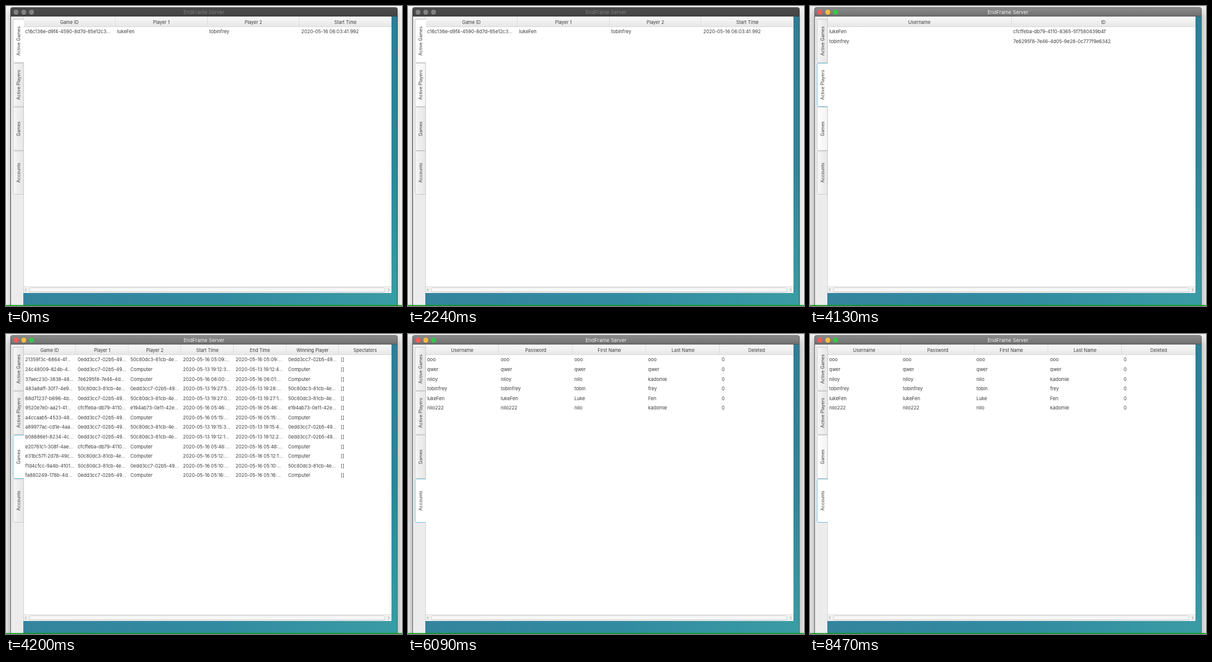
Write an HTML page with a canvas that moves like this. It is 640 by 485 pixels and loops after 8.61 s.

```html
<!DOCTYPE html>
<html lang="en">
<head>
<meta charset="utf-8">
<title>EndFrame Server</title>
<style>
  html, body { margin: 0; width: 100%; height: 100%; overflow: hidden; background: #fff; }
  canvas { display: block; width: 640px; height: 485px; }
</style>
</head>
<body>
<canvas id="stage" width="640" height="485"></canvas>
<script>
const ctx = document.getElementById('stage').getContext('2d');
const LOOP = 8610;
const FONT = 'Inter, "Open Sans", sans-serif';
const INK = '#3c3c3c';
const TABS = ['Active Games', 'Active Players', 'Games', 'Accounts'];

// [start time, tab index]; the window gains focus with the first click.
const FOCUS_AT = 2450;
const SELECTED = [[0, 0], [FOCUS_AT, 1], [4200, 2], [6090, 3]];
const HOVERED = [[0, -1], [1540, 1], [3570, 2], [5390, 3], [8190, 2]];

const TABLE = { x: 28, y: 17, w: 595, h: 447 };
const ROW_STEP = 15.58;

const ANN = '0edd3cc7-02b5-49...';
const BEA = '50c80dc3-81cb-4e...';
const CAL = 'cfcffeba-db79-4110...';
const DOT = 'e194ab73-0e11-42e...';
const EVE = '7e6295f8-7e46-4d...';
const BOT = 'Computer';
const game = (id, first, second, start, end, winner) =>
  [id + '...', first, second, `2020-05-${start}...`, `2020-05-${end}...`, winner, '[]'];
const account = (user, first, last) => [user, user, first, last, '0'];

const VIEWS = [
  {
    heads: ['Game ID', 'Player 1', 'Player 2', 'Start Time'],
    rows: [['c16c136e-d9f4-4590-8d7d-65e12c3...', 'lukeFen', 'tobinfrey', '2020-05-16 06:03:41.992']]
  },
  {
    heads: ['Username', 'ID'],
    rows: [
      ['lukeFen', 'cfcffeba-db79-4110-8365-5f7580439b4f'],
      ['tobinfrey', '7e6295f8-7e46-4d05-9e28-0c777f9e6342']
    ]
  },
  {
    heads: ['Game ID', 'Player 1', 'Player 2', 'Start Time', 'End Time', 'Winning Player', 'Spectators'],
    rows: [
      game('21359f3c-6864-4f', ANN, BEA, '16 05:09:', '16 05:09:', ANN),
      game('24c48009-824b-4', ANN, BOT, '13 19:12:3', '13 19:12:4', BOT),
      game('37aec230-3838-48', EVE, BOT, '16 06:00:', '16 06:01:', BOT),
      game('483a8aff-30f7-4e9', BEA, ANN, '13 19:27:5', '13 19:28:', BEA),
      game('68d71237-b696-4b', ANN, BEA, '13 19:27:0', '13 19:27:1', BEA),
      game('9520e7e0-aa21-41', CAL, DOT, '16 05:46:', '16 05:46:', DOT),
      game('a4ccaab5-4533-48', ANN, BOT, '16 05:15:', '16 05:15:', BOT),
      game('a89977ac-cd1e-4aa', ANN, BEA, '13 19:15:3', '13 19:15:4', ANN),
      game('b08686e1-8234-4c', ANN, BEA, '13 19:12:1', '13 19:12:2', ANN),
      game('e20761c1-308f-4ae', CAL, BOT, '16 05:48:', '16 05:48:', BOT),
      game('e31bc57f-2d78-49c', BEA, BOT, '16 05:12:', '16 05:12:1', BOT),
      game('f1d4cfcc-9a4b-4101', BEA, ANN, '16 05:10:', '16 05:10:', BEA),
      game('fa880249-176b-4d', ANN, BOT, '16 05:16:', '16 05:16:', BOT)
    ]
  },
  {
    heads: ['Username', 'Password', 'First Name', 'Last Name', 'Deleted'],
    rows: [
      account('ooo', 'ooo', 'ooo'),
      account('qwer', 'qwer', 'qwer'),
      account('niloy', 'nilo', 'kadomie'),
      account('tobinfrey', 'tobin', 'frey'),
      account('lukeFen', 'Luke', 'Fen'),
      account('nilo222', 'nilo', 'kadomie')
    ]
  }
];

const valueAt = (track, t) => track.filter(([start]) => start <= t).pop()[1];

function gradient(x0, y0, x1, y1, ...colors) {
  const g = ctx.createLinearGradient(x0, y0, x1, y1);
  colors.forEach((color, i) => g.addColorStop(i / (colors.length - 1), color));
  return g;
}

function rect(x, y, w, h, fill) {
  ctx.fillStyle = fill;
  ctx.fillRect(x, y, w, h);
}

function rounded(x, y, w, h, radius, fill, stroke) {
  ctx.beginPath();
  ctx.roundRect(x, y, w, h, radius);
  ctx.fillStyle = fill;
  ctx.fill();
  if (stroke) {
    ctx.strokeStyle = stroke;
    ctx.stroke();
  }
}

function text(str, x, y, size, color, align = 'left') {
  ctx.font = `${size}px ${FONT}`;
  ctx.textAlign = align;
  ctx.fillStyle = color;
  ctx.fillText(str, x, y);
}

function drawWindow(active) {
  rect(0, 0, 640, 485, '#f6f6f6');
  ctx.save();
  ctx.shadowColor = active ? 'rgba(0,0,0,.4)' : 'rgba(0,0,0,.25)';
  ctx.shadowBlur = active ? 15 : 10;
  ctx.shadowOffsetY = 5;
  rounded(7, 2, 626, 500, 4, active ? '#666' : '#484848');
  ctx.restore();

  const bar = active ? ['#8b8b8b', '#6d6d6d'] : ['#4c4c4c', '#434343'];
  rounded(8, 3, 624, 14, [3, 3, 0, 0], gradient(0, 3, 0, 17, ...bar));
  rect(8, 16, 624, 1, active ? '#585858' : '#3a3a3a');
  const lights = active ? ['#fc5b57', '#fdbc40', '#34c84a'] : ['#828282', '#828282', '#828282'];
  lights.forEach((color, i) => {
    ctx.beginPath();
    ctx.arc(16.2 + i * 12.5, 10, 3.9, 0, Math.PI * 2);
    ctx.fillStyle = color;
    ctx.fill();
  });
  text('EndFrame Server', 320, 13, 8.1, active ? '#f2f2f2' : '#7d7d7d', 'center');

  rect(8, 17, 20, 467, '#ececec');
  rect(28, 464, 604, 20, gradient(28, 0, 632, 0, '#34849d', '#318aa0', '#3a9ca5'));
  rect(623, 17, 9, 467, gradient(0, 17, 0, 484, '#2d7e97', '#2f8499', '#3a9ca5'));
}

function drawTab(i, selected, hovered, active) {
  const y = 22 + i * 71;
  const focused = selected && active;
  const fill = selected ? '#fff'
    : hovered ? gradient(12, 0, 28, 0, '#fff', '#f2f2f2')
    : gradient(12, 0, 28, 0, '#f5f5f5', '#e6e6e6');
  rounded(11.5, y - .5, 17, 70, [2, 0, 0, 2], fill, focused ? '#7cc2da' : '#cccccc');
  if (selected) rect(28, y, 1, 69, '#fff');
  ctx.save();
  ctx.translate(23, y + 34.5);
  ctx.rotate(-Math.PI / 2);
  text(TABS[i], 0, 0, 7.25, INK, 'center');
  ctx.restore();
}

function chevron(x, direction) {
  ctx.beginPath();
  ctx.moveTo(x - direction, 456.5);
  ctx.lineTo(x + direction, 459);
  ctx.lineTo(x - direction, 461.5);
  ctx.strokeStyle = '#a4a4a4';
  ctx.stroke();
}

function drawTable({ heads, rows }) {
  const { x, y, w, h } = TABLE;
  const columnWidth = w / heads.length;
  rect(x, y, w, h, '#fff');
  rect(x, y, w, 17, gradient(0, y, 0, y + 17, '#f9f9f9', '#e6e6e6'));
  rect(x, y + 16, w, 1, '#dadada');
  heads.forEach((head, i) => {
    const left = x + i * columnWidth;
    if (i) rect(Math.round(left) - 1, y, 1, 17, '#dedede');
    text(head, left + columnWidth / 2, 28.5, 7.4, INK, 'center');
  });
  rows.forEach((row, r) => row.forEach((cell, c) =>
    text(cell, x + 3 + c * columnWidth, 44.4 + r * ROW_STEP, 7.65, INK)));

  rect(x, 454, w, 10, '#f1f1f1');
  rect(x, 453, w, 1, '#e2e2e2');
  rounded(37.5, 455.5, 575, 7, 3, gradient(0, 455, 0, 463, '#fff', '#eee'), '#cecece');
  chevron(32, -1);
  chevron(618.5, 1);
  rect(x, y, 1, h, '#d6d6d6');
}

function draw(now) {
  const t = now % LOOP;
  const active = t >= FOCUS_AT;
  const selected = valueAt(SELECTED, t);
  const hovered = valueAt(HOVERED, t);
  ctx.lineWidth = 1;
  drawWindow(active);
  drawTable(VIEWS[selected]);
  TABS.forEach((_, i) => drawTab(i, i === selected, i === hovered, active));
  rect(0, 483.5, 640, 1.5, '#0a9a14');
  requestAnimationFrame(draw);
}
requestAnimationFrame(draw);
</script>
</body>
</html>
```
